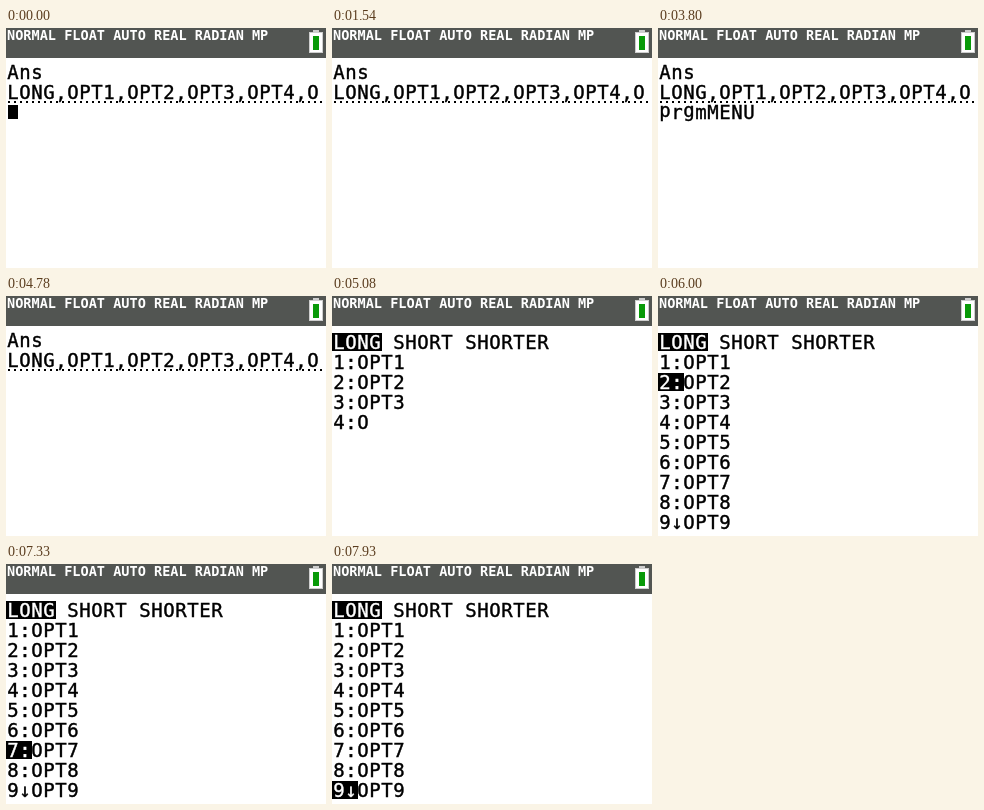
Recreate the animation shown at these times as an HTML page with a canvas. Size 320 by 240 pixels, loop 8000 ms.

```html
<!DOCTYPE html>
<html lang="en">
<head>
<meta charset="utf-8">
<title>Calculator menu</title>
<style>
html, body { margin: 0; width: 100%; height: 100%; overflow: hidden; background: #fff; }
canvas { display: block; }
</style>
</head>
<body>
<canvas id="screen" width="320" height="240"></canvas>
<script>
const ctx = document.getElementById('screen').getContext('2d');
const LOOP = 8000, CELL = 12, ROW = 20, TOP = 37;
const MONO = '"DejaVu Sans Mono", monospace';
const BIG = '19px ' + MONO;
const SMALL = 'bold 13.57px ' + MONO;

const PROGRAMS = ['EXEC EDIT NEW', '1:MENU'];
const OPTIONS = ['LONG SHORT SHORTER'];
for (let i = 1; i <= 9; i++) OPTIONS.push(i + (i < 9 ? ':' : '↓') + 'OPT' + i);

// Times at which the highlight leaves a row and reaches the next one.
const MOVES = [[6000, 6000], [6280, 6320], [6500, 6500], [6920, 6960],
  [7190, 7190], [7330, 7330], [7700, 7700], [7930, 7930]];
const BLINKS = [180, 510, 880, 1210, 1540, 1870, 3800, 4170, 4500];

function rect(x, y, w, h, color) {
  ctx.fillStyle = color;
  ctx.fillRect(x, y, w, h);
}

// One letter per cell, thickened slightly to give solid two-pixel strokes.
function write(text, x, y, color = '#000') {
  ctx.font = BIG;
  ctx.fillStyle = ctx.strokeStyle = color;
  ctx.lineWidth = 0.4;
  [...text].forEach((c, i) => {
    const left = x + i * CELL + 0.3;
    const base = y - (c === 'p' || c === 'g' ? 2 : 0);
    ctx.fillText(c, left, base);
    ctx.strokeText(c, left, base);
  });
}

function statusBar() {
  rect(0, 0, 320, 30, '#525552');
  ctx.font = SMALL;
  ctx.fillStyle = '#fff';
  ctx.fillText('NORMAL FLOAT AUTO REAL RADIAN MP', 1, 12);
  rect(307, 2, 6, 2, '#cecece');
  rect(303, 4, 14, 21, '#cecece');
  rect(304, 5, 12, 19, '#fff');
  rect(307, 8, 6, 14, '#089a08');
}

function home(lines, entry, cursor) {
  if (lines > 0) write('Ans', 1, TOP + 14);
  if (lines > 1) {
    write('LONG,OPT1,OPT2,OPT3,OPT4,O', 1, TOP + ROW + 14);
    for (let x = 2; x < 316; x += 6) rect(x, 73, 2, 2, '#000');
  }
  const y = TOP + 2 * ROW;
  write(entry, 1, y + 14);
  if (cursor) rect(2 + entry.length * CELL, y, 10, 14, '#000');
}

// Draws up to `count` characters; the first `tab` letters of the title are inverted.
function menu(rows, tab, selected, count = Infinity) {
  rows.forEach((row, i) => {
    const text = row.slice(0, Math.max(0, count));
    count -= row.length;
    const y = TOP + i * ROW;
    const marked = Math.min(text.length, i === 0 ? tab : i === selected ? 2 : 0);
    if (marked) rect(0, y, marked * CELL + 2, 18, '#000');
    write(text.slice(0, marked), 1, y + 16, '#fff');
    write(text.slice(marked), 1 + marked * CELL, y + 16);
  });
}

function selection(t) {
  let row = 1;
  for (const [leave, arrive] of MOVES) {
    if (t >= arrive) row++;
    else if (t >= leave) return 0;
  }
  return row;
}

function draw(t) {
  rect(0, 0, 320, 240, '#fff');
  statusBar();
  const cursor = BLINKS.filter(b => b <= t).length % 2 === 0;
  if (t < 2200) home(2, '', cursor);
  else if (t < 2290) return;
  else if (t < 3320) menu(PROGRAMS, 4, 1);
  else if (t < 3520) {
    const step = Math.floor((t - 3320) / 40);
    home(step, 'prgmMENU'.slice(0, Math.max(0, step - 2) * 4), false);
  } else if (t < 4780) home(2, 'prgmMENU', cursor);
  else if (t < 4920) home(2, '', false);
  else if (t < 5200) menu(OPTIONS, 4, 0, Math.floor((t - 4920) / 40) * 11 - 5);
  else menu(OPTIONS, 4, selection(t));
}

const start = performance.now();
function tick() {
  draw((performance.now() - start) % LOOP);
  requestAnimationFrame(tick);
}
tick();
</script>
</body>
</html>
```
